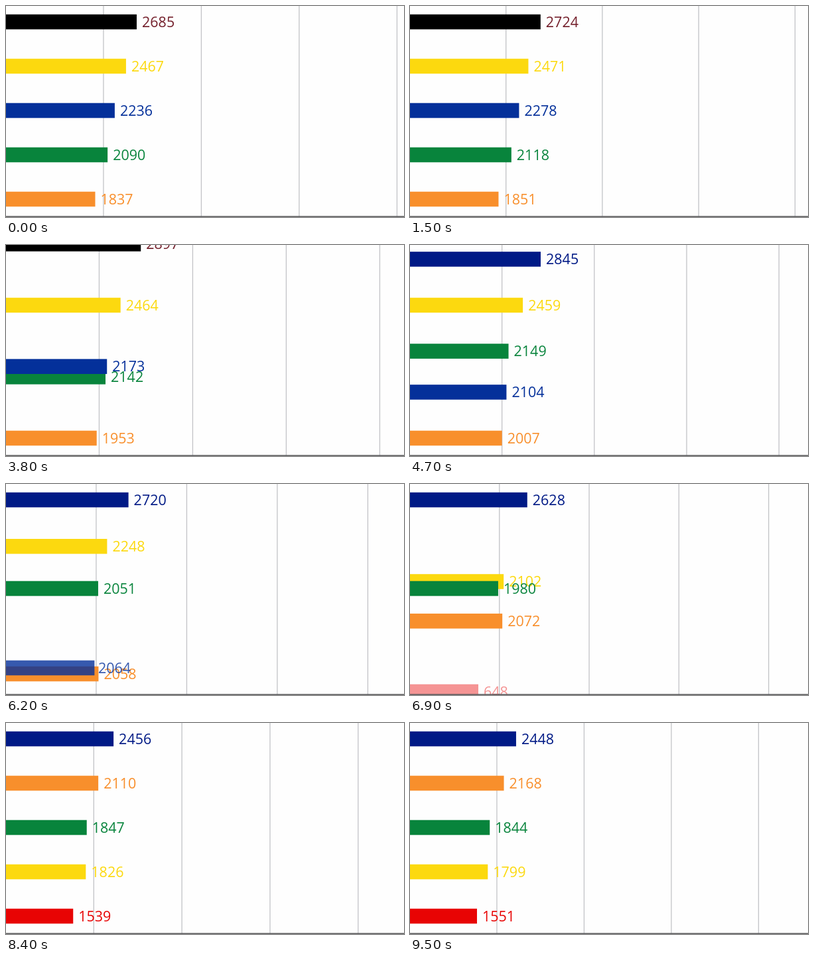
An HTML page with a canvas for the animation above (9600 ms loop, 600 by 319 pixels).

```html
<!DOCTYPE html>
<html lang="en">
<head>
<meta charset="utf-8">
<title>Bar chart race</title>
<style>
  html, body { margin: 0; width: 100%; height: 100%; overflow: hidden; background: #fefefe; }
  canvas { display: block; }
</style>
</head>
<body>
<canvas id="stage" width="600" height="319"></canvas>
<script>
const ctx = document.getElementById('stage').getContext('2d');
const LOOP = 9.6, STEP = 0.1;
const ORIGIN = -1, ROW_TOP = 24, ROW_GAP = 67, BAR_HEIGHT = 22.6;

// Every series and the axis scale are linear between these times (seconds).
const KNOTS = [0, 2.2, 5.2, 8.2, 9.5];
const GRID_GAP = [147.5, 144.2, 138.2, 133.1, 131.5];   // pixels per 2000 units

// rows: [from, to], moving for two seconds from `start`
const bars = [
  { color: '#f88f2c', values: [1837, 1858, 2037, 2099, 2168], rows: [4, 1], start: 6 },
  { color: '#fcd90f', values: [2467, 2472.5, 2456, 1831, 1799], rows: [1, 3], start: 6 },
  { color: '#08843c', values: [2090, 2131, 2152, 1848, 1844], rows: [3, 2], start: 2.95 },
  { color: '#04309a', values: [2236, 2297, 2065, 2062, 2062], rows: [2, 3], start: 2.95, exit: 6 },
  { color: '#e80404', values: [1537, 1537, 1537, 1537, 1551], rows: [4.57, 4], start: 6, enters: true },
  { color: '#000000', label: '#74202c', values: [2685, 2742, 3033, 3100, 3150], rows: [0, -1], start: 2.95 },
  { color: '#001a86', values: [2800, 2815, 2851, 2457, 2448], rows: [-1, 0], start: 2.95 }
];

const clamp = x => Math.max(0, Math.min(1, x));
const mix = (a, b, k) => a + (b - a) * k;
const easeSine = x => (1 - Math.cos(Math.PI * clamp(x))) / 2;

function sample(list, t) {
  let i = 0;
  while (i < KNOTS.length - 2 && t > KNOTS[i + 1]) i++;
  return mix(list[i], list[i + 1], (t - KNOTS[i]) / (KNOTS[i + 1] - KNOTS[i]));
}

function drawBar(bar, t, scale) {
  const move = easeSine((t - bar.start) / 2);
  const leave = bar.exit ? clamp(t - bar.exit) : 0;
  const opacity = bar.enters ? move : 1 - leave;
  if (opacity <= 0) return;

  const y = ROW_TOP + ROW_GAP * mix(...bar.rows, move) + 265 * leave;
  const value = sample(bar.values, t);
  const end = ORIGIN + value * scale * (1 - 0.23 * leave);
  const shown = bar.enters ? value * move : value;

  ctx.globalAlpha = opacity;
  ctx.fillStyle = bar.color;
  ctx.fillRect(0, y - BAR_HEIGHT / 2, end, BAR_HEIGHT);
  ctx.fillStyle = bar.label || bar.color;
  ctx.fillText(Math.round(shown), end + 8 - 12 * leave, y + 7.7);
  ctx.globalAlpha = 1;
}

function draw(t) {
  ctx.fillStyle = '#fefefe';
  ctx.fillRect(0, 0, 600, 319);

  const gap = sample(GRID_GAP, t);
  ctx.fillStyle = '#c2c3c7';
  for (let i = 1; i <= 4; i++) ctx.fillRect(ORIGIN + i * gap - 0.2, 0, 1.3, 318);

  ctx.font = '21.5px "Open Sans", "Noto Sans", sans-serif';
  for (const bar of bars) drawBar(bar, t, gap / 2000);

  ctx.fillStyle = '#5c5c5e';
  ctx.fillRect(0, 317.5, 600, 1.5);
}

function tick() {
  const t = performance.now() / 1000 % LOOP;
  draw(Math.floor(t / STEP + 1e-6) * STEP);
  requestAnimationFrame(tick);
}
tick();
</script>
</body>
</html>
```
